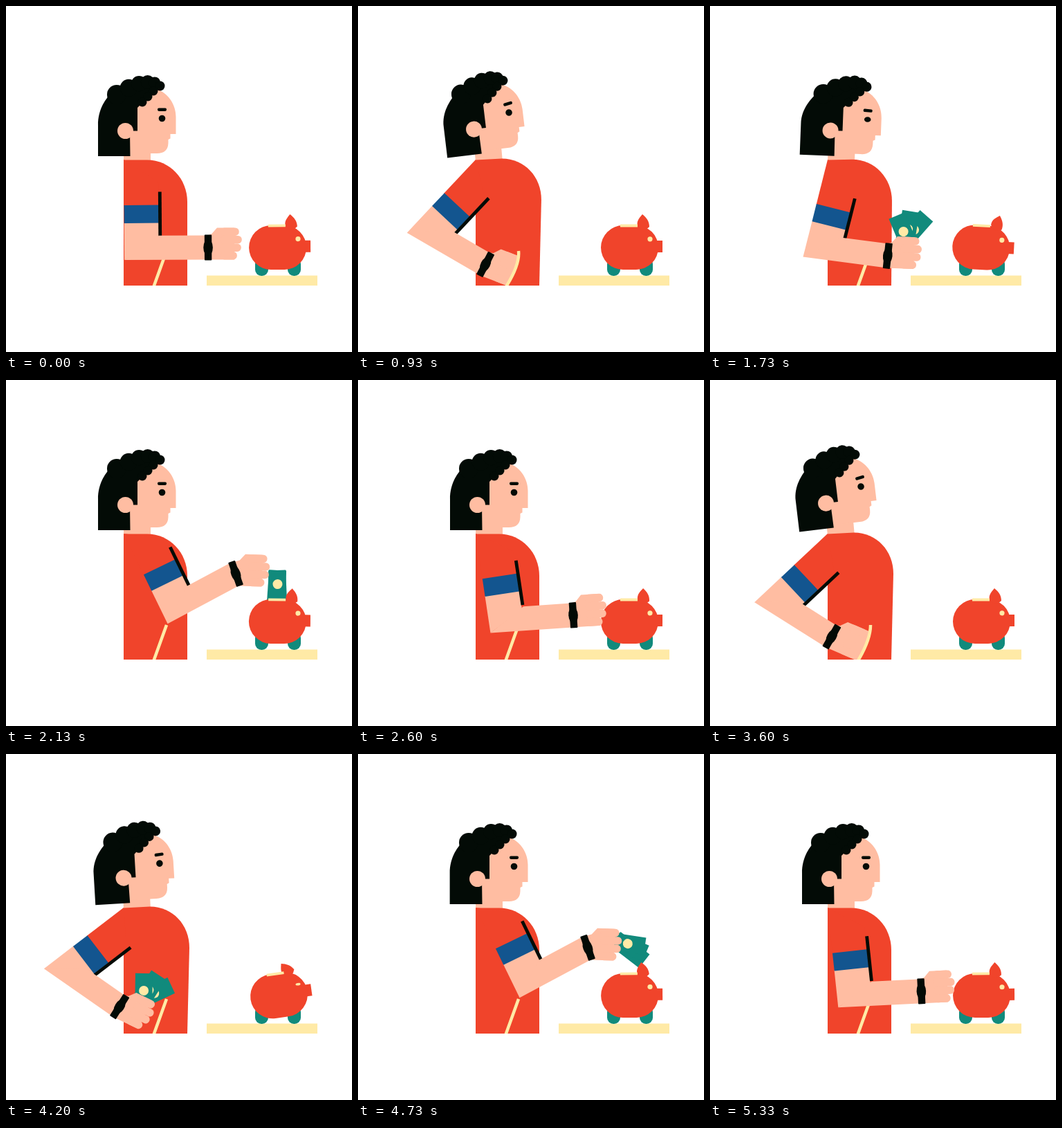
An HTML page with a canvas that plays this animation: 500 by 500 pixels, repeating every 5390 ms.

```html
<!DOCTYPE html>
<html lang="en">
<head>
<meta charset="utf-8">
<title>Saving up</title>
<style>
html, body { margin: 0; width: 100%; height: 100%; overflow: hidden; background: #fff; }
canvas { display: block; width: 100vw; height: 100vh; }
</style>
</head>
<body>
<canvas id="stage"></canvas>
<script>
const SIZE = 500, LOOP = 5390, STEPS = 81, CYCLE = STEPS / 2;
const RED = '#f0442b', SKIN = '#ffbda2', BLACK = '#030b06', BLUE = '#13558f',
      TEAL = '#118a7c', CREAM = '#ffeaa6';
const SHOULDER = [170, 222], NECK = [150, 221], SLOT = [392, 284];

const canvas = document.getElementById('stage');
const c = canvas.getContext('2d');
const ratio = window.devicePixelRatio || 1;
canvas.width = canvas.height = SIZE * ratio;

const rad = deg => deg * Math.PI / 180;
const clamp = x => Math.max(0, Math.min(1, x));
const mix = (a, b, k) => a + (b - a) * k;

// Eased step from 0 to 1, and a soft bump, between two times.
function ramp(s, from, to) {
  const t = clamp((s - from) / (to - from));
  return t * t * (3 - 2 * t);
}
const bump = (s, from, to) => Math.sin(Math.PI * clamp((s - from) / (to - from))) ** 2;

// Fading swing after a push.
function wobble(s, start, fade) {
  const x = (s - start + CYCLE) % CYCLE;
  return -Math.exp(-x / fade) * Math.sin(x * 2 * Math.PI / 7);
}
const wobbles = (s, fade) => wobble(s, 25, fade) + .3 * wobble(s, 36.5, fade);

function turn([px, py], x, y, deg) {
  const co = Math.cos(rad(deg)), si = Math.sin(rad(deg));
  return [px + x * co - y * si, py + x * si + y * co];
}

function poseAt(s) {
  const back = ramp(s, 0, 15) - ramp(s, 25.9, 34.2);
  const dip = ramp(s, 16, 20.5) - ramp(s, 21, 24.5);
  const put = ramp(s, 31, 35) - ramp(s, 36.5, 40.5);
  const away = ramp(s, 4.5, 15);
  const nod = bump(s, 27, 34);

  const upper = -16 + 72 * back - 22 * dip - 10 * put;
  const lean = clamp(upper / 44);
  const fore = upper * (.48 + .0035 * upper) + 5 * dip - 18 * put;
  const handTurn = fore - 9 * Math.sqrt(lean) + 30 * put;
  const elbow = turn(SHOULDER, 0, 145, upper);
  const hand = turn(elbow, 121, -17.5, fore);

  const go = ramp(s, 33, 36.5);
  const grip = turn(hand, 26, -26, handTurn);
  return {
    upper, lean, fore, handTurn, elbow, hand,
    bulge: clamp(2 * dip),
    inPocket: s > 14 && s < 25,
    head: -6.8 * (away - ramp(s, 24.5, 29.5)) + 2.2 * nod,
    lift: -1.5 * nod,
    hair: 3.5 * (away - ramp(s, 31, 36)),
    blink: 1 - .85 * bump(s, 27.5, 31.1),
    hasNotes: s > 20.5,
    notes: [mix(grip[0], SLOT[0], go), mix(grip[1], SLOT[1], go) + 48 * ramp(s, 36.5, 40)],
    notesTurn: mix(handTurn + 70 * (1 - ramp(s, 23.5, 27)), 180, go),
    fan: ramp(s, 22.5, 26.5) * (1 - .9 * go),
    pig: 14.4 * wobbles(s, 3.6),
    pigEar: 38 * wobbles(s, 8)
  };
}

function at([x, y], deg, draw) {
  c.save();
  c.translate(x, y);
  c.rotate(rad(deg));
  draw();
  c.restore();
}

function fill(color, path) {
  c.fillStyle = color;
  c.fill(typeof path === 'string' ? new Path2D(path) : path);
}

function poly(color, ...pts) {
  fill(color, 'M' + pts.map(p => p.join()).join('L') + 'Z');
}

function box(color, x, y, w, h, r = 0) {
  const p = new Path2D();
  p.roundRect(x, y, w, h, r);
  fill(color, p);
}

function dot(color, x, y, rx, ry = rx) {
  const p = new Path2D();
  p.ellipse(x, y, rx, ry, 0, 0, 7);
  fill(color, p);
}

function drawHair(shift) {
  const x = 133 - shift;
  fill(BLACK, `M${x} 217V172C${x} 150 143 136 150 128L178 114L222 115L190 147V180.5H179L179.5 217Z`);
  for (let i = 0; i < 6; i++)
    dot(BLACK, 160 + 18.5 * i - 1.2 * i * i, 128 - 11.5 * i + 1.8 * i * i, 14 - 1.4 * i);
  for (let i = 0; i < 3; i++) dot(BLACK, 213 - 8 * i, 123 + 8 * i, 6.5);
}

function drawHead(p) {
  const pivot = [NECK[0], NECK[1] + p.lift];
  const onHead = (x, y) => turn(pivot, x - NECK[0], y - NECK[1], p.head);
  poly(SKIN, [170, 225], onHead(170, 200), onHead(209, 200), [209, 225]);
  at(pivot, p.head, () => {
    c.translate(-NECK[0], -NECK[1]);
    fill(SKIN, 'M178 140L220 121C237 128 245.5 145 245.5 160V185H237.5V191.5L234.5 193V198Q234 213 218 213H178Z');
    drawHair(p.hair);
    dot(SKIN, 172.5, 180.5, 11.5);
    dot(BLACK, 225.5, 162.5, 4.8, 4.8 * p.blink);
    at([225.5, 149.7], p.head * 1.4, () => box(BLACK, -6.5, -2.2, 13, 4.4, 1.8));
  });
}

function drawTorso({ lean }) {
  const x = 262 + 3 * lean, y = 283 - 3 * lean, sx = 204 + 4 * lean, sy = 222.5 - 2 * lean;
  fill(RED, `M170 404V222.5L${sx} ${sy}C${sx + 33} ${sy} ${x} ${y - 33} ${x} ${y}L262 404Z`);
}

const curve = b => `Q${223 + 11 * b} ${379 - 6 * b} ${214 + b} 404`;

function drawPocket({ bulge }) {
  c.save();
  c.beginPath();
  c.rect(0, 0, SIZE, 404);
  c.clip();
  c.strokeStyle = CREAM;
  c.lineWidth = 4.5;
  c.stroke(new Path2D(`M232 354${curve(bulge)}L212 410`));
  c.restore();
}

function drawNotes(p) {
  at(p.notes, p.notesTurn, () => {
    for (let i = 1; i >= -1; i--) {
      at([0, 0], (7 + 32 * i) * p.fan, () => {
        box(TEAL, -12.5, -40 - 4 * i, 25, 49 + 4 * i);
        dot(CREAM, 0, -14 - 3 * i, 7);
      });
    }
  });
}

function drawHand(p) {
  at(p.hand, p.handTurn, () => {
    const end = 38 + 14 * p.bulge;
    poly(SKIN, [-3, -17], [5, -19.5], [13, -28.5], [end, -28.5], [end, 17.5], [-3, 17.5]);
    for (let i = 0; i < 4; i++)
      box(SKIN, 18, -28.5 + 11.5 * i, 31 - 2.5 * (i - 1.3) ** 2, 11.5, 5.5);
  });
}

// Keeps what is inside the pocket out of sight.
function tucked(p, draw) {
  c.save();
  if (p.inPocket) c.clip(new Path2D(`M0 0H232V354${curve(p.bulge)}H0Z`));
  draw(p);
  c.restore();
}

function drawUpper(p) {
  at(SHOULDER, p.upper, () => {
    const start = 47 - 20 * p.lean ** 2;
    poly(RED, [0, 0], [50, 33], [50, 67], [0, 67]);
    poly(SKIN, [0, 91], [50, 91], [50, 118], [0, 145]);
    box(BLUE, 0, 66, 50, 26);
    box(BLACK, 49.5, start, 4.8, 112 - start);
  });
}

function drawFore(p) {
  at(p.elbow, p.fore, () => poly(SKIN, [0, 0], [50, -35], [122, -35], [122, 0]));
}

function drawWatch(p) {
  at(p.hand, mix(p.fore, p.handTurn, .3), () => {
    box(BLACK, -5.2, -18.5, 10.4, 37, 1);
    dot(BLACK, 0, 0, 6.8, 12);
  });
}

function drawPig(p) {
  for (const x of [360, 407]) box(TEAL, x, 364, 19, 26, 9);
  at([392 - p.pig / 4, 349], p.pig, () => {
    c.translate(-392, -349);
    box(RED, 430, 339, 10, 17);
    box(RED, 351, 317, 83, 64, 32);
    at([412, 320], p.pigEar, () =>
      fill(RED, 'M-8 -2C-10 -10 -4 -15 -1 -19C5 -14 9 -9 9 -1Q0 8 -8 -2Z'));
    box(CREAM, 379, 315.6, 25, 3.8);
    dot(CREAM, 422, 336.8, 3.6, 3.6 * (1 + Math.min(0, p.pig) / 16));
  });
}

function draw(step) {
  const p = poseAt((step + 4.5) % CYCLE);
  c.setTransform(ratio, 0, 0, ratio, 0, 0);
  c.fillStyle = '#fff';
  c.fillRect(0, 0, SIZE, SIZE);
  drawHead(p);
  drawTorso(p);
  if (!p.inPocket) drawPocket(p);
  box(CREAM, 290, 389.5, 160, 14.5);
  drawUpper(p);
  if (p.hasNotes) tucked(p, drawNotes);
  drawPig(p);
  drawFore(p);
  tucked(p, drawHand);
  drawWatch(p);
  if (p.inPocket) drawPocket(p);
}

const began = performance.now();

function tick() {
  const t = (performance.now() - began) % LOOP;
  draw(Math.floor((t + 5) / (LOOP / STEPS)) % STEPS);
  requestAnimationFrame(tick);
}
tick();
</script>
</body>
</html>
```
